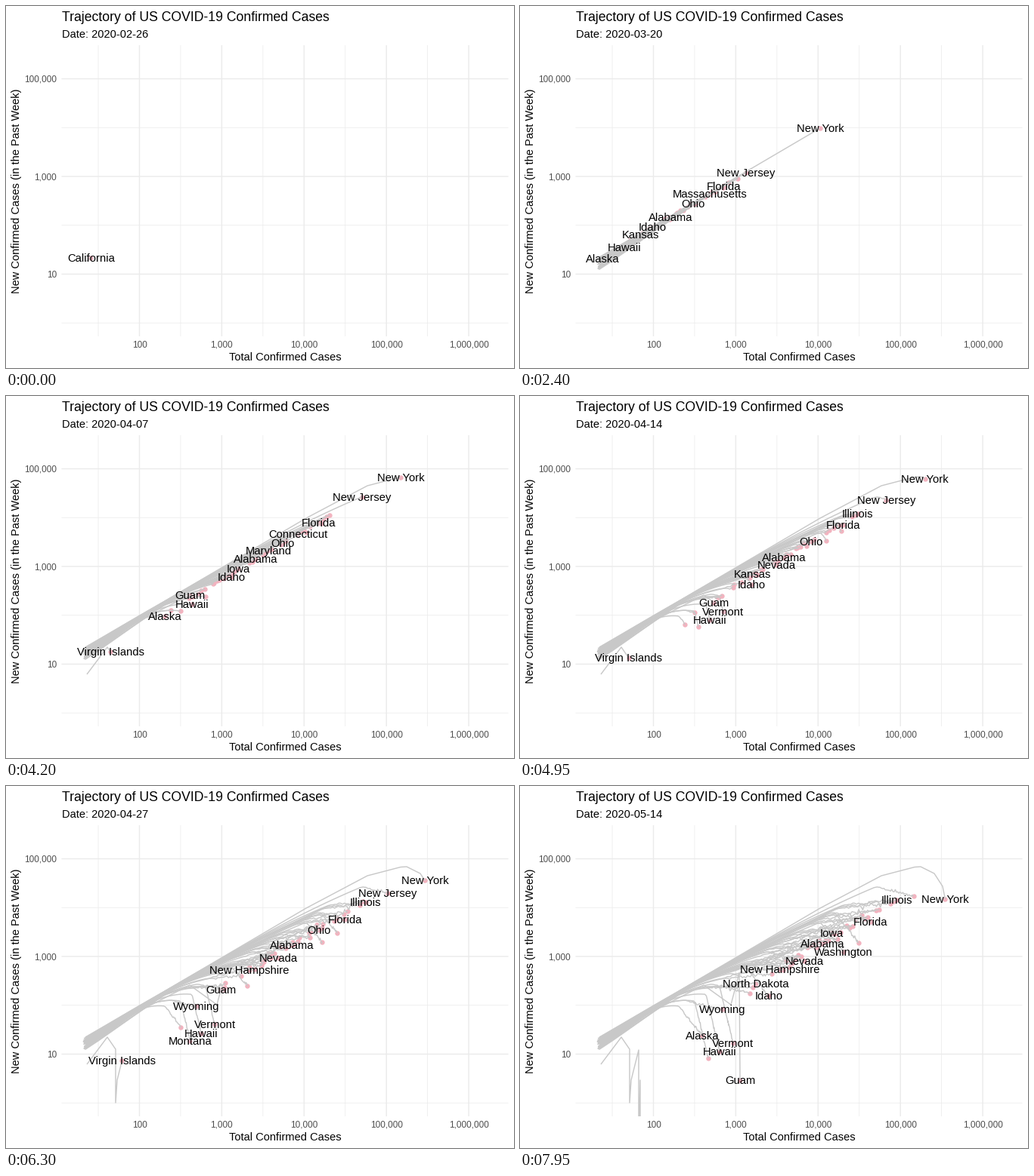
A matplotlib script that plays this animation: 672x480 px, repeating every 8 s.

```python
import numpy as np
import matplotlib.pyplot as plt
from matplotlib.animation import FuncAnimation
from matplotlib.collections import LineCollection
from matplotlib.patches import Rectangle

plt.rcParams["font.family"] = "Liberation Sans"
WIDTH, HEIGHT = 672, 480
LEFT, TOP, RIGHT, BOTTOM = 73.5, 52, 664.5, 438
DAYS_PER_STEP = 146 / 99
STEP_MS, TICK_MS, LOOP_MS = 150, 50, 8000
PEAK_DAY, LAST_DAY = 41.3, 78.2
LABEL_HEIGHT = 9.8
rng = np.random.default_rng(11)

# Regions by size: each block starts at its final x, every next one is 4 px left.
# An empty name is a region without a label.
BLOCKS = {
    521: "New Jersey",
    498: "Illinois,Massachusetts,California",
    475: ",",
    464: "Florida,Texas,Connecticut,Maryland,Louisiana,Virginia,Indiana,Ohio,,Washington,"
         ",,,Iowa,,,Alabama,Rhode Island,Mississippi,Nebraska,Kansas,Kentucky,Nevada,"
         ",,,,,,,New Hampshire",
    333: "Puerto Rico,Idaho",
    312: "North Dakota,,West Virginia",
    282: "Vermont",
    268: "Wyoming,Hawaii",
    249: "Montana",
    241: "Alaska",
}
# Rightward travel after the peak day; all other regions move steadily.
STEADY = 70
GROWTH = {
    105: "Maryland,Virginia,Iowa,Nebraska,Rhode Island,Kansas,Kentucky",
    50: "New Jersey,Florida,Nevada,Wyoming,West Virginia",
    31: "Louisiana,Washington,Idaho,Alaska",
    18: "Vermont,Hawaii,Montana",
}
EARLY_START = {"California": -1, "Washington": 1, "Massachusetts": 8.6, "Texas": 11}
# Key points (day, x, y) of the regions that follow no common rule.
UNUSUAL = {
    "New York": [(6.5, 105, 333), (11.8, 193, 282), (23.6, 397, 162), (33, 478, 119),
                 (41.3, 522, 107.5), (46, 530, 107), (54.6, 548, 116), (67.8, 559, 133),
                 (78.2, 562.5, 150)],
    "Guam": [(22, 105, 335), (41.3, 243, 264), (61, 279, 290), (63, 290, 248),
             (67.8, 291, 376), (78.2, 291, 390)],
    "Virgin Islands": [(26, 107, 369), (36, 134, 333), (50, 145, 349), (52, 145, 420),
                       (54.6, 147, 390), (66, 157, 350), (67.8, 157, 366),
                       (70, 157, 480), (74, 159, 390), (77, 159, 480)],
}
# Labels that win when two would overlap; the rest follow by size.
PRIORITY = ("New York,Alabama,Florida,Illinois,Massachusetts,New Jersey,California,Hawaii,"
            "Guam,Alaska,Virgin Islands,Idaho,Nevada,Kansas,Kentucky,Ohio,Indiana,"
            "Connecticut,Mississippi,Maryland,Louisiana,Virginia,Nebraska").split(",")

fig = plt.figure(figsize=(WIDTH / 96, HEIGHT / 96), dpi=96, facecolor="white")
ax = fig.add_axes([0, 0, 1, 1])
ax.set(xlim=(0, WIDTH), ylim=(HEIGHT, 0))
ax.axis("off")


def x_of(exponent):
    return 176.5 + 108.9 * (exponent - 2)


def y_of(exponent):
    return 355.5 - 64.75 * (exponent - 1)


def diagonal(x):
    """Height at which weekly cases equal total cases."""
    return 290.75 - 0.5946 * (x - 176.5)


def write(x, y, text, size=11, **style):
    return ax.text(x, y, text, fontsize=size, va="baseline", **style)


def draw_background():
    def grid(xs, ys, width):
        style = dict(color="#ebebeb", lw=width, zorder=0, snap=False)
        ax.vlines(xs, TOP, BOTTOM, **style)
        ax.hlines(ys, LEFT, RIGHT, **style)

    x_powers, y_powers = np.arange(2, 7), np.arange(1, 6, 2)
    grid(x_of(np.arange(1.5, 6)), y_of(np.arange(0, 5, 2)), 0.53)
    grid(x_of(x_powers), y_of(y_powers), 1.07)
    ticks = dict(size=8.8, color="#4d4d4d")
    for n in x_powers:
        write(x_of(n), 453, f"{10 ** n:,}", ha="center", **ticks)
    for n in y_powers:
        write(67, y_of(n) + 4.5, f"{10 ** n:,}", ha="right", **ticks)
    write(73.5, 20, "Trajectory of US COVID-19 Confirmed Cases", 13.2)
    write(369, 470, "Total Confirmed Cases", ha="center")
    ax.text(21, 245, "New Confirmed Cases (in the Past Week)", fontsize=11,
            rotation=90, ha="right", va="center")


class Region:
    """Runs up the diagonal until the peak day, then slows and sinks below it."""

    def __init__(self, name, x_end, growth):
        self.name, self.x_end, self.growth = name, x_end, growth
        x_peak = x_end - growth
        self.start = EARLY_START.get(name, 12 + 0.055 * max(0, 415 - x_peak))
        self.power = 1 if name in EARLY_START else 0.68
        self.x_start = 102 + rng.uniform(0, 4)
        self.spread = rng.uniform(0, 16)
        self.noise = rng.normal(0, 1.5, 80)

    def at(self, day):
        u = np.clip((day - self.start) / (PEAK_DAY - self.start), 0, 1)
        v = np.clip((day - PEAK_DAY) / (LAST_DAY - PEAK_DAY), 0, 1)
        ease = 1 - (1 - v) ** 1.4
        x_peak = self.x_end - self.growth
        x = self.x_start + (x_peak - self.x_start) * u ** self.power + self.growth * ease
        # The slower a region grows, the further it falls below the diagonal.
        gap_peak, gap_end = 13 + 250 / self.growth, 30 + 1500 / self.growth
        gap = self.spread * (1 - u) ** 4 + gap_peak * u ** 2.5 + (gap_end - gap_peak) * ease
        wiggle = np.interp(day, np.arange(80), self.noise) * np.sin(np.pi * v)
        return x, diagonal(x) + gap + wiggle

    def trail(self, day):
        days = np.r_[self.start, np.arange(np.floor(self.start) + 1, day), day]
        return np.column_stack(self.at(days))


class UnusualRegion(Region):
    """Moves straight from one key point to the next."""

    def __init__(self, name, points):
        self.name = name
        self.t, self.x, self.y = np.array(points).T
        self.start = self.t[0]

    def at(self, day):
        return np.interp(day, self.t, self.x), np.interp(day, self.t, self.y)

    def trail(self, day):
        return np.column_stack(self.at(np.r_[self.t[self.t < day], day]))


def make_regions():
    growth_of = {name: g for g, names in GROWTH.items() for name in names.split(",")}
    regions = [UnusualRegion(name, points) for name, points in UNUSUAL.items()]
    for x_first, names in BLOCKS.items():
        for n, name in enumerate(names.split(",")):
            growth = growth_of.get(name, STEADY) if name else rng.uniform(55, 95)
            regions.append(Region(name, x_first - 4 * n, growth))
    rank = {name: n for n, name in enumerate(PRIORITY)}
    return sorted(regions, key=lambda r: rank.get(r.name, len(rank)))


regions = make_regions()
draw_background()
panel = Rectangle((LEFT, TOP), RIGHT - LEFT, BOTTOM - TOP, transform=ax.transData)
dots = ax.scatter([], [], s=23, color="#f2b3bf", linewidths=0, zorder=2)
trails = ax.add_collection(LineCollection([], colors="#c8c8c8", linewidths=1.07, zorder=3))
for artist in (trails, dots):
    artist.set_clip_path(panel)
date = write(73.5, 42, "")
labels = [write(0, 0, r.name, 11.04, ha="center", zorder=4) for r in regions]
renderer = fig.canvas.get_renderer()
widths = [label.get_window_extent(renderer).width for label in labels]


def place_labels(day):
    placed = []
    for region, label, width in zip(regions, labels, widths):
        x, y = region.at(day)
        free = all(abs(x - px) > (width + pw) / 2 or abs(y - py) > LABEL_HEIGHT
                   for px, py, pw in placed)
        show = bool(region.name and day >= region.start and y < BOTTOM and free)
        label.set_visible(show)
        if show:
            label.set_position((x, y + 5))
            placed.append((x, y, width))


def update(tick):
    day = tick * TICK_MS // STEP_MS * DAYS_PER_STEP
    active = [r for r in regions if r.start <= day]
    trails.set_segments([r.trail(day) for r in active])
    dots.set_offsets([r.at(day) for r in active])
    date.set_text(f"Date: {np.datetime64('2020-02-26') + int(day)}")
    place_labels(day)
    return [trails, dots, date, *labels]


anim = FuncAnimation(fig, update, frames=LOOP_MS // TICK_MS, interval=TICK_MS,
                     init_func=lambda: update(0), repeat=True, repeat_delay=0)
plt.show()
```
